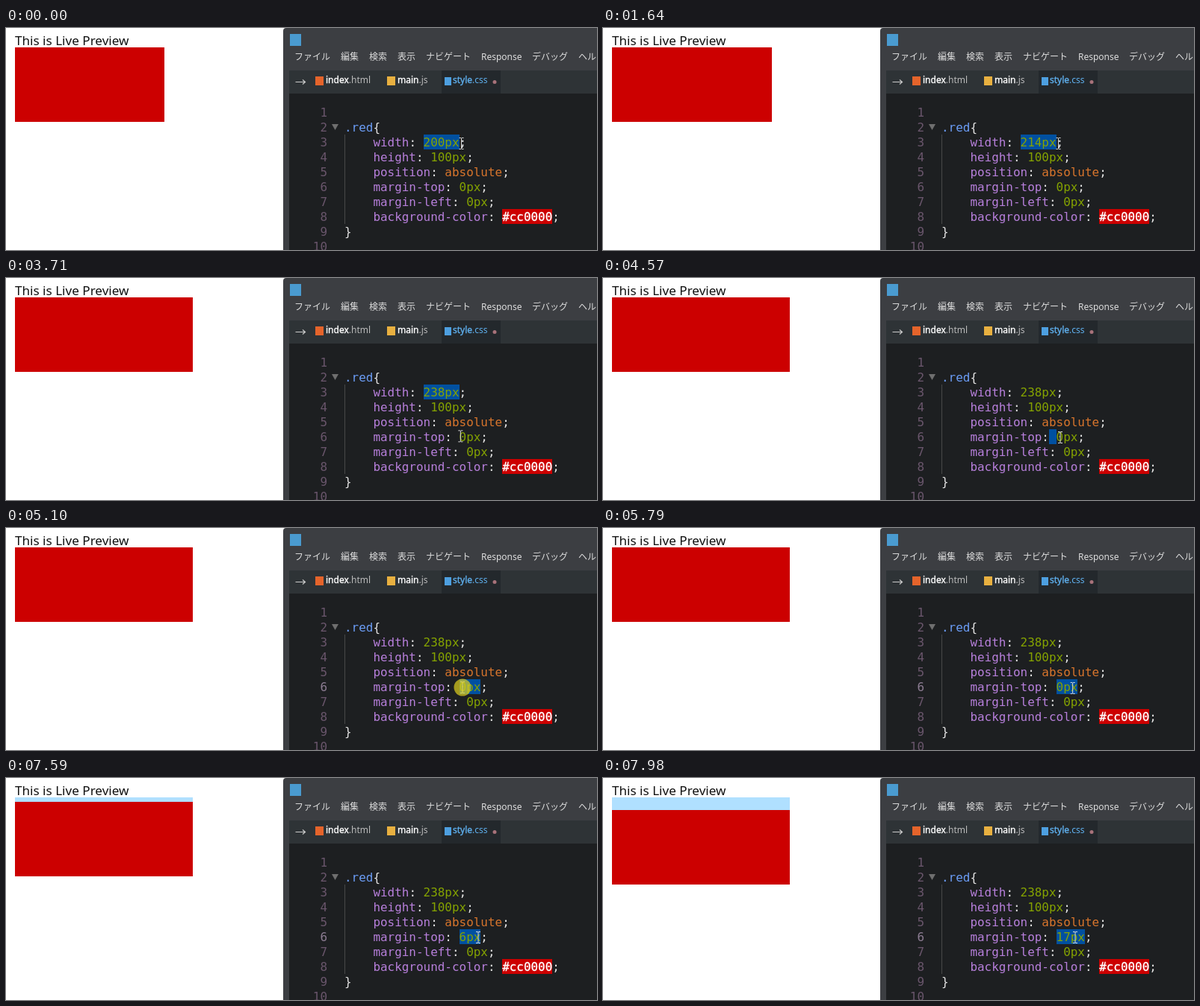
Recreate the animation shown at these times as an HTML page. Size 791 px wide and 298 px high, loop 8000 ms.

```html
<!DOCTYPE html>
<html lang="ja">
<head>
<meta charset="utf-8">
<title>Live Preview</title>
<style>
html, body { margin: 0; width: 100%; height: 100%; overflow: hidden; background: #fff; }
svg { display: block; width: 791px; height: 298px; }
rect { shape-rendering: crispEdges; }
.page { font: 17.1px "Noto Sans", sans-serif; fill: #111; }
.menu { font: 12px "Noto Sans", "Noto Sans CJK JP", "Noto Sans CJK", sans-serif; fill: #ddd; }
.tabs { font: 12px "Noto Sans", sans-serif; fill: #bbb; }
.name { fill: #fff; stroke: #fff; stroke-width: .35px; }
.open, .open .name { fill: #5fb0ee; }
.open .name { stroke: #5fb0ee; }
.code { font: 15.95px "DejaVu Sans Mono", monospace; fill: #e4e4e4; }
.nums { fill: #6a566c; text-anchor: end; }
.sel { fill: #6c9ef8; }
.prop { fill: #b77fdb; }
.num { fill: #85a300; }
.atom { fill: #d8752c; }
.hex { fill: #fff; stroke: #fff; stroke-width: .35px; }
</style>
</head>
<body>
<svg viewBox="0 0 791 298">
  <text class="page" x="12" y="23">This is Live Preview</text>
  <rect id="margin" x="12" y="26" height="0" fill="#b0e0ff"/>
  <rect id="box" x="12" y="26" width="200" height="100" fill="#c00"/>

  <!-- editor window -->
  <path d="M371 298V4q0-4 4-4H791V298z" fill="#3c3e42"/>
  <rect x="379" y="57" width="412" height="31" fill="#2e3336"/>
  <rect x="583" y="57" width="79" height="31" fill="#23282c"/>
  <rect x="379" y="88" width="412" height="210" fill="#1d1f21"/>
  <rect x="380" y="8" width="15" height="16" fill="#4a9bd0"/>

  <g class="menu">
    <text x="386" y="43">ファイル</text>
    <text x="448" y="43">編集</text>
    <text x="486" y="43">検索</text>
    <text x="524" y="43">表示</text>
    <text x="562" y="43">ナビゲート</text>
    <text x="636" y="43">Response</text>
    <text x="704" y="43">デバッグ</text>
    <text x="766" y="43">ヘルプ</text>
  </g>

  <path d="M387.500 72.500H400M397 69.500l3.500 3-3.500 3" fill="none" stroke="#ccc" stroke-width="1.2"/>
  <rect x="414" y="65" width="11" height="12" fill="#e5642b"/>
  <rect x="510" y="65" width="11" height="12" fill="#e8b040"/>
  <rect x="587" y="66" width="9" height="11" fill="#4d9fe0"/>
  <g class="tabs">
    <text x="428" y="74"><tspan class="name">index</tspan>.html</text>
    <text x="524" y="74"><tspan class="name">main</tspan>.js</text>
    <text class="open" x="598" y="74"><tspan class="name">style</tspan>.css</text>
  </g>
  <circle cx="654" cy="72.5" r="2.5" fill="#a8727a"/>

  <!-- code -->
  <rect id="line" x="447" y="203" width="344" height="20" fill="#2f2f2f"/>
  <rect x="453" y="143" width="1" height="120" fill="#484848"/>
  <path d="M436 129h9l-4.5 8z" fill="#6f6f6f"/>
  <rect id="mark" height="20" fill="#0050a0"/>
  <rect x="664" y="243" width="67" height="20" fill="#c00"/>
  <g class="code nums" id="nums"></g>
  <g class="code">
    <text x="453" y="139"><tspan class="sel">.red</tspan>{</text>
    <text x="491.4" y="159"><tspan class="prop">width</tspan>: <tspan class="num" id="width">200px</tspan>;</text>
    <text x="491.4" y="179"><tspan class="prop">height</tspan>: <tspan class="num">100px</tspan>;</text>
    <text x="491.4" y="199"><tspan class="prop">position</tspan>: <tspan class="atom">absolute</tspan>;</text>
    <text x="491.4" y="219"><tspan class="prop">margin-top</tspan>: <tspan class="num" id="top">0px</tspan>;</text>
    <text x="491.4" y="239"><tspan class="prop">margin-left</tspan>: <tspan class="num">0px</tspan>;</text>
    <text x="491.4" y="259"><tspan class="prop">background-color</tspan>: <tspan class="hex">#cc0000</tspan>;</text>
    <text x="453" y="279">}</text>
  </g>

  <g id="mouse">
    <path d="M-3-7.5h2.2L0-7l.8-.5H3M0-7V7M-3 7.5h2.2L0 7l.8.5H3" fill="none" stroke="#ddd"/>
    <circle id="press" r="11.5" fill="#e0d020" fill-opacity=".7"/>
  </g>
</svg>
<script>
const LOOP = 8000, COL = 9.6, CODE_X = 453;
const $ = id => document.getElementById(id);
const set = (id, attrs) => {
  for (const k in attrs) $(id).setAttribute(k, attrs[k]);
};
const show = (id, on) => set(id, { visibility: on ? "visible" : "hidden" });

for (let n = 1; n <= 10; n++) {
  $("nums").insertAdjacentHTML("beforeend", `<text id="n${n}" x="430" y="${99 + 20 * n}">${n}</text>`);
}

// Each stretch: first step, last step, number of steps, value reached
const widths = [
  [300, 300, 1, 201], [680, 680, 1, 202], [850, 850, 1, 203],
  [1310, 2100, 11, 228], [2170, 2480, 5, 238]
];
const tops = [[6800, 6800, 1, 1], [7030, 7030, 1, 2], [7490, 7980, 7, 17]];
const xs = [
  [2930, 2930, 1, 600], [3250, 3480, 4, 616], [3630, 3790, 3, 604.5],
  [4190, 4260, 3, 608], [4490, 4570, 2, 612], [4720, 4720, 1, 611],
  [5180, 5640, 7, 627], [5790, 5950, 3, 632]
];
const ys = [
  [3250, 3480, 4, 209], [3630, 3790, 3, 214],
  [5180, 5640, 7, 215.5], [5790, 5950, 3, 214]
];
const presses = [[4190, 4570], [4720, 4870], [5100, 5790]];

function stepped(list, value, t) {
  for (const [from, to, n, goal] of list) {
    if (t < from) break;
    const k = to > from ? Math.min(n, Math.floor((t - from) / (to - from) * (n - 1) + 1e-6) + 1) : n;
    value += (goal - value) * k / n;
  }
  return value;
}

function select(line, col, chars) {
  const left = Math.round(CODE_X + COL * col);
  const right = Math.round(CODE_X + COL * (col + chars));
  set("mark", { x: left, y: 83 + 20 * line, width: right - left });
}

function draw(t) {
  const w = Math.round(stepped(widths, 200, t));
  const top = Math.round(stepped(tops, 0, t));
  set("box", { width: w, y: 26 + top });
  set("margin", { width: w, height: top });
  $("width").textContent = w + "px";
  $("top").textContent = top + "px";

  if (t < 4190) select(3, 11, 5);
  else if (t < 4260) select(6, 15, 0);
  else if (t < 4720) select(6, 15, 1);
  else if (t < 5100) select(6, 16, 0);
  else select(6, 16, String(top).length + 2);

  show("line", t >= 4720 && t < 5100);
  $("n6").style.fill = t < 4720 ? "" : "#8c7c92";

  const x = stepped(xs, 609.5, t), y = stepped(ys, 155, t);
  set("mouse", { transform: `translate(${x} ${y})` });
  show("press", presses.some(([a, b]) => t >= a && t < b));
}

const start = performance.now();
function frame() {
  draw((performance.now() - start) % LOOP);
  requestAnimationFrame(frame);
}
draw(0);
requestAnimationFrame(frame);
</script>
</body>
</html>
```
